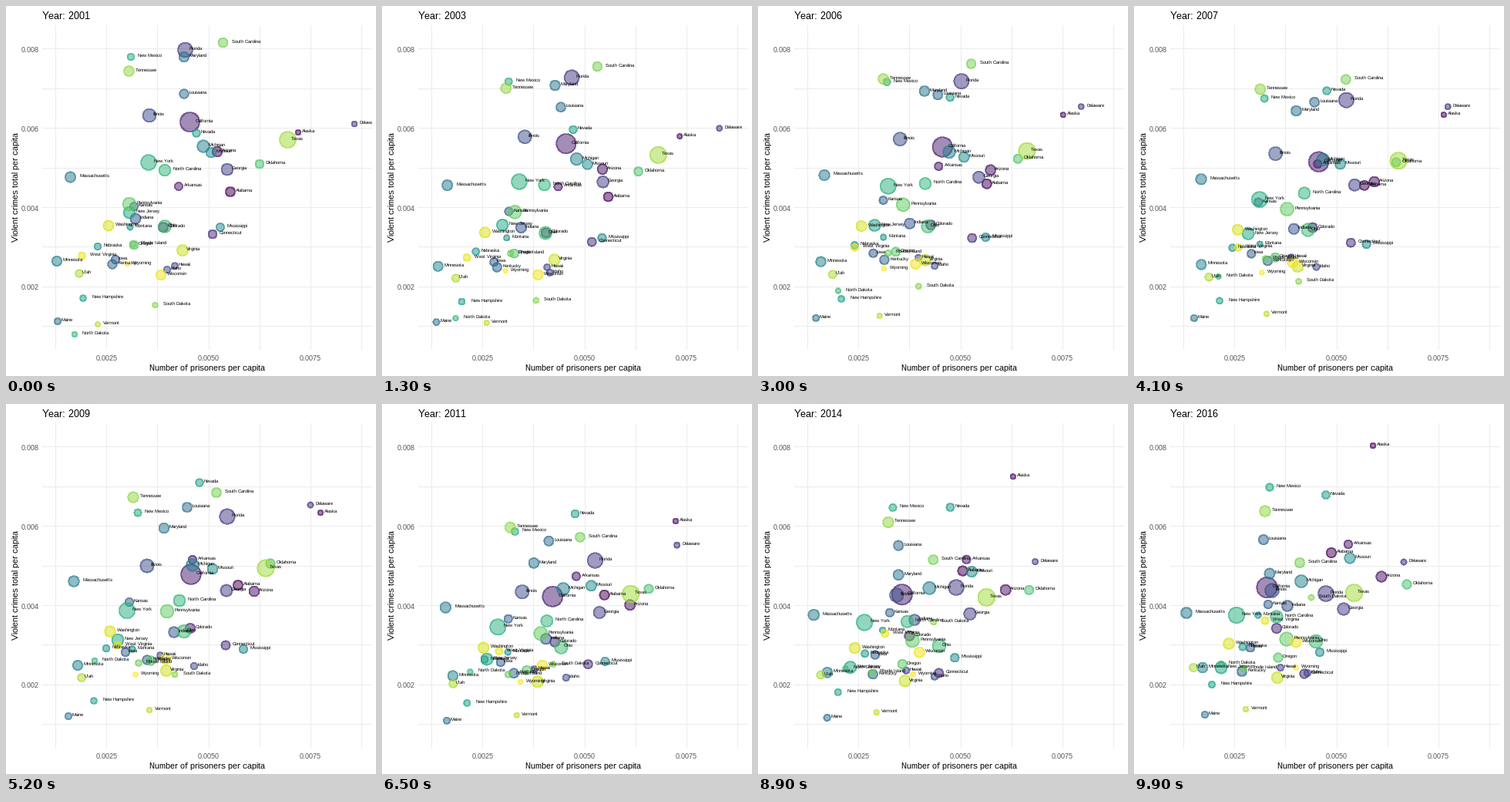
Recreate the animation shown at these times as a matplotlib script. Size 480 by 480 pixels, loop 10000 ms.

```python
import numpy as np
import matplotlib
import matplotlib.pyplot as plt
from matplotlib.animation import FuncAnimation

matplotlib.rcParams.update({
    "font.family": "Liberation Sans",
    "text.hinting": "native",
    "text.hinting_factor": 1,
})

SIZE, DPI, FRAMES = 480, 72, 100
LEFT, RIGHT, TOP, BOTTOM = 47, 474.5, 24.5, 446
ZERO_Y = 467        # stage height of a crime rate of zero
GROWTH = 0.13       # population growth over the whole period
POP_MIN, POP_MAX = 0.49, 39.25

names, pops, paths = [], [], []


def state(name, pop, *path):
    """Population in millions; positions in 2001, 2009 and 2016."""
    names.append(name)
    pops.append(pop)
    paths.append(path)


state("Alabama", 4.5, (291, 241), (301, 235), (256, 193))
state("Alaska", 0.63, (379, 164), (408, 141), (310, 54))
state("Arizona", 5.5, (274, 189), (322, 243), (321, 224))
state("Arkansas", 2.7, (224, 234), (242, 202), (278, 182))
state("California", 34.5, (238.5, 150.5), (240, 221), (172.5, 238))
state("Colorado", 4.5, (204, 287), (239, 291), (185, 291))
state("Connecticut", 3.4, (268, 296), (285, 313), (221, 350))
state("Delaware", 0.8, (452, 153), (395, 131), (350, 205))
state("Florida", 16.7, (232.5, 57), (287, 146), (249, 246))
state("Georgia", 8.5, (287, 212), (286, 242), (272, 266))
state("Hawaii", 1.2, (219, 337), (200, 326), (190, 342))
state("Idaho", 1.4, (209, 342), (244, 340), (225, 349))
state("Illinois", 12.2, (186, 142), (183, 210), (179, 242))
state("Indiana", 6.1, (168, 276), (218, 296), (199, 262))
state("Iowa", 2.9, (142, 329), (155, 322), (151, 316))
state("Kansas", 2.7, (166, 260), (160, 257), (174, 260))
state("Kentucky", 4, (138, 335), (183, 332), (140, 347))
state("Louisiana", 4.4, (231, 114), (235, 134), (168, 176))
state("Maine", 1.3, (67, 409), (81, 405), (92, 403))
state("Maryland", 5.4, (231, 66), (205, 161), (176, 220))
state("Massachusetts", 6.2, (83.5, 222), (88, 230), (68, 271))
state("Michigan", 9.5, (256, 182), (242, 209), (217, 230))
state("Minnesota", 5, (66, 331), (93, 339), (89, 342))
state("Mississippi", 2.8, (278, 287), (308, 318), (241, 322))
state("Missouri", 5.6, (266, 190), (268, 214), (280, 200))
state("Montana", 0.9, (161, 287), (164, 318), (161, 274))
state("Nebraska", 1.7, (119, 312), (130, 317), (141, 315))
state("Nevada", 2.3, (247, 165), (251, 102), (249, 118))
state("New Hampshire", 1.2, (100, 379), (114, 385), (101, 364))
state("New Jersey", 8.2, (160, 268), (145, 306), (113, 342))
state("New Mexico", 1.8, (162, 66), (171, 141), (176, 108))
state("New York", 18.5, (185, 203), (157, 268), (133, 274))
state("North Carolina", 8.4, (206, 213), (225, 255), (185, 276))
state("North Dakota", 0.65, (89, 426), (115, 333), (113, 337))
state("Ohio", 10.8, (206, 286), (231, 295), (236, 308))
state("Oklahoma", 3.5, (329, 205), (343, 207), (354, 234))
state("Oregon", 3.5, (166, 310), (188, 333), (187, 329))
state("Pennsylvania", 11.9, (160, 257), (209, 269), (198, 305))
state("Rhode Island", 1, (165, 309), (172, 336), (142, 343))
state("South Carolina", 4.2, (281.5, 47.5), (273, 115), (215, 206))
state("South Dakota", 0.76, (193.5, 388), (219, 351), (230, 251))
state("Tennessee", 5.8, (159.5, 84.5), (165, 121), (170, 139))
state("Texas", 22, (365.5, 173.5), (337, 213), (285.5, 245))
state("Utah", 2.4, (95, 347), (98, 355), (77, 342))
state("Vermont", 0.6, (119, 413), (186, 397), (145, 396))
state("Virginia", 7.2, (229, 317), (208, 346), (186, 355))
state("Washington", 6.1, (133, 285), (135, 295), (123, 311))
state("West Virginia", 1.75, (98.5, 324), (145, 313), (170, 281))
state("Wisconsin", 5.3, (201, 349), (207, 331), (210, 309))
state("Wyoming", 0.49, (157.5, 335), (168, 351), (210, 342))

pops, paths = np.array(pops), np.array(paths)


def positions(n):
    """Straight legs between the key years, with the nationwide dip in crime."""
    leg, part = (0, n / 52) if n < 52 else (1, (n - 52) / 47)
    pos = paths[:, leg] * (1 - part) + paths[:, leg + 1] * part
    dip = np.interp(n, (0, 13, 30, 52, 65, 79, 99), (0, 0.035, -0.03, 0, 0.1, 0.11, 0))
    pos[:, 1] += dip * (ZERO_Y - pos[:, 1])
    return pos


def areas(t):
    """Marker areas; size runs from 2 to 12 with the root of the population."""
    share = np.clip((pops * (1 + GROWTH * t) - POP_MIN) / (POP_MAX - POP_MIN), 0, 1)
    radius = 0.375 * ((2 + 10 * np.sqrt(share)) * 2.845 + 0.94)
    return (2 * radius) ** 2


fig = plt.figure(figsize=(SIZE / DPI, SIZE / DPI), dpi=DPI, facecolor="white")
ax = fig.add_axes([LEFT / SIZE, 1 - BOTTOM / SIZE,
                   (RIGHT - LEFT) / SIZE, (BOTTOM - TOP) / SIZE])
ax.set(xlim=(LEFT, RIGHT), ylim=(BOTTOM, TOP))
ax.axis("off")


def note(x, y, text, size, color="black", **kw):
    return fig.text(x / SIZE, 1 - y / SIZE, text, fontsize=size, color=color, **kw)


grid = dict(color="#EBEBEB", lw=1, zorder=0)
for i in range(7):
    ax.axvline(64 + 66.2 * i, **grid)
for i in range(8):
    ax.axhline(55.4 + 51.4 * i, **grid)

for i in range(3):
    note(130.3 + 132.4 * i, 460, f"{0.0025 * (i + 1):.4f}", 8.8, "#4D4D4D", ha="center")
for i in range(4):
    note(42.5, 60 + 102.8 * i, f"{0.008 - 0.002 * i:.3f}", 8.8, "#4D4D4D", ha="right")
note(260.5, 473, "Number of prisoners per capita", 11, ha="center")
note(18, 235.5, "Violent crimes total per capita", 11, rotation=90,
     ha="right", va="center")
title = note(47, 17, "", 13)

colors = plt.get_cmap("viridis")(np.linspace(0, 1, len(names)))
colors[:, 3] = 0.5
dots = ax.scatter(*positions(0).T, s=areas(0), facecolors=colors, edgecolors=colors,
                  linewidths=1, antialiased=False, zorder=2)
labels = [ax.text(LEFT, TOP, name, fontsize=5.9, clip_on=True, zorder=3) for name in names]
shifts = [0.3 * label.get_window_extent().width for label in labels]


def update(n):
    t = n / (FRAMES - 1)
    title.set_text(f"Year: {round(2001 + 15 * t)}")
    pos = positions(n)
    dots.set_offsets(pos)
    dots.set_sizes(areas(t))
    for label, shift, (x, y) in zip(labels, shifts, pos):
        label.set_position((x + shift, y))
    return [title, dots, *labels]


anim = FuncAnimation(fig, update, frames=FRAMES, interval=100,
                     repeat=True, repeat_delay=0, blit=False)
plt.show()
```
